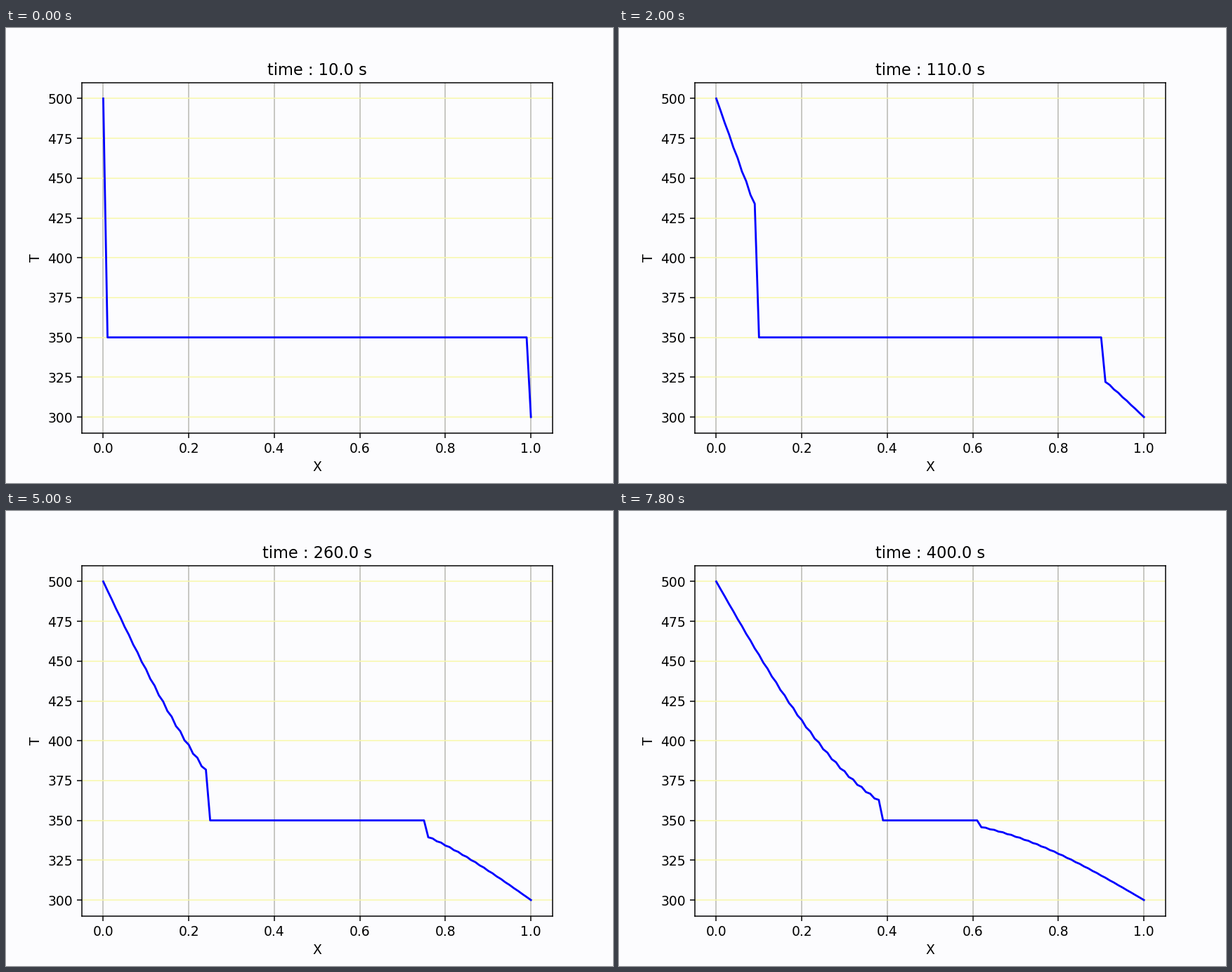
Write a matplotlib script that moves like this. It is 864 by 648 pixels and loops after 8 s.

```python
import numpy as np
import matplotlib.pyplot as plt
from matplotlib.animation import FuncAnimation

FRAMES = 40
INTERVAL = 200      # ms
DT = 10.0           # s
NODES = 101
ALPHA = 7.5e-5      # diffusivity
PAPER = "#fcfcfe"
GRID_X = "#b8b8b0"
GRID_Y = "#f8f8a8"

x = np.linspace(0, 1, NODES)


def solve(steps):
    """Heat equation in a rod, three-level DuFort-Frankel scheme."""
    r = 2 * ALPHA * DT / (x[1] - x[0]) ** 2
    start = np.full(NODES, 350.0)
    start[0], start[-1] = 500.0, 300.0
    levels = [start, start.copy()]
    while len(levels) < steps:
        old, now = levels[-2:]
        new = now.copy()
        new[1:-1] = ((1 - r) * old[1:-1] + r * (now[2:] + now[:-2])) / (1 + r)
        levels.append(new)
    return levels


profiles = solve(FRAMES)

plt.rcParams["font.family"] = "DejaVu Sans"
fig, ax = plt.subplots(figsize=(6.4, 4.8), dpi=135, facecolor=PAPER)
ax.set_facecolor(PAPER)
line, = ax.plot(x, profiles[0], color="blue", lw=1.5)
ax.set_xlim(-0.05, 1.05)
ax.set_ylim(290, 510)
ax.set_xlabel("X")
ax.set_ylabel("T")
ax.grid(True, axis="x", color=GRID_X, lw=0.8)
ax.grid(True, axis="y", color=GRID_Y, lw=0.8)
title = ax.set_title("")


def update(k):
    line.set_ydata(profiles[k])
    title.set_text(f"time : {DT * (k + 1):.1f} s")
    return line, title


anim = FuncAnimation(fig, update, frames=FRAMES, interval=INTERVAL,
                     repeat=True, repeat_delay=0, blit=False)
plt.show()
```
